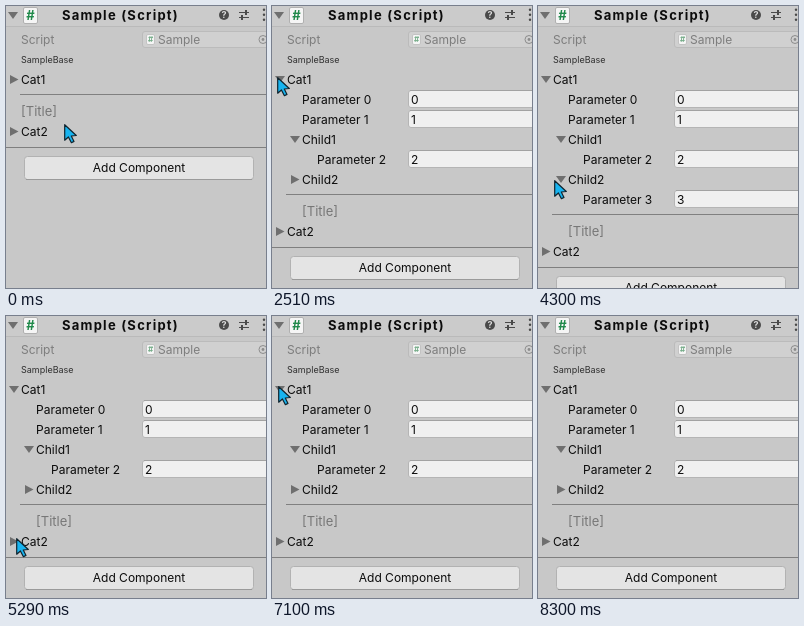
These frames come from a looping animation (260x282 px, 8.83 s). An HTML page with a canvas:

```html
<!DOCTYPE html>
<html lang="en">
<head>
<meta charset="utf-8">
<title>Component inspector</title>
<style>
html, body { margin: 0; width: 100%; height: 100%; overflow: hidden; background: #c8c8c8; }
canvas { display: block; width: 260px; height: 282px; }
</style>
</head>
<body>
<canvas id="stage"></canvas>
<script>
const W = 260, H = 282, LOOP = 8830, ROW = 20;
const canvas = document.getElementById('stage');
const ctx = canvas.getContext('2d');
const dpr = window.devicePixelRatio || 1;
canvas.width = W * dpr;
canvas.height = H * dpr;

const FONT = 'Inter, Roboto, sans-serif';
const INK = '#0c0c0c', ARROW = '#6f6f6f', FADED = '#7d7d7d';

// Pointer legs: first step, last step, number of steps, way points.
const HOME = [58, 118];
const LEGS = [
  [120, 1080, 8, [[61, 172], [57, 226], [40, 168], [26, 104]]],
  [1200, 2230, 8, [[14, 87], [7, 75], [5, 71]]],
  [2640, 3460, 7, [[13, 105], [25, 150], [29, 174]]],
  [3710, 3860, 2, [[15, 174]]],
  [4300, 4300, 1, [[16, 174]]],
  [4880, 5290, 4, [[9, 195], [10, 222]]],
  [6440, 7100, 6, [[10, 165], [8, 100], [6, 70]]],
  [7910, 8170, 3, [[40, 110], [85, 165], [133, 225]]]
];
const HIDE_AT = 8300;

const within = (t, a, b) => t >= a && t < b;

function spline(pts, u) {
  const last = pts.length - 1;
  const i = Math.min(Math.floor(u * last), last - 1);
  const f = u * last - i;
  const at = k => pts[Math.max(0, Math.min(last, k))];
  const [a, b, c, d] = [at(i - 1), at(i), at(i + 1), at(i + 2)];
  return [0, 1].map(n => b[n] + 0.5 * f * (c[n] - a[n] +
    f * (2 * a[n] - 5 * b[n] + 4 * c[n] - d[n] +
    f * (3 * (b[n] - c[n]) + d[n] - a[n]))));
}

function pointerAt(t) {
  let pos = HOME;
  for (const [start, end, steps, pts] of LEGS) {
    if (t < start) break;
    const gap = (end - start) / Math.max(1, steps - 1);
    const step = gap ? Math.min(steps, Math.floor((t - start) / gap + 1e-6) + 1) : 1;
    pos = spline([pos, ...pts], step / steps);
  }
  return pos.map(Math.round);
}

function text(str, x, y, { size = 12, color = INK, weight = 400, align = 'left', spacing = 0 } = {}) {
  ctx.font = `${weight} ${size}px ${FONT}`;
  ctx.letterSpacing = spacing + 'px';
  ctx.textAlign = align;
  ctx.fillStyle = color;
  ctx.fillText(str, x, y);
}

function rect(x, y, w, h, color) {
  ctx.fillStyle = color;
  ctx.fillRect(x, y, w, h);
}

function box(x, y, w, h, r, fill, stroke) {
  ctx.beginPath();
  ctx.roundRect(x + 0.5, y + 0.5, w - 1, h - 1, r);
  ctx.fillStyle = fill;
  ctx.fill();
  ctx.lineWidth = 1;
  ctx.strokeStyle = stroke;
  ctx.stroke();
}

function disc(x, y, r, color) {
  ctx.beginPath();
  ctx.arc(x, y, r, 0, Math.PI * 2);
  ctx.fillStyle = color;
  ctx.fill();
}

function polygon(pts, color) {
  ctx.beginPath();
  pts.forEach(([x, y]) => ctx.lineTo(x, y));
  ctx.closePath();
  ctx.fillStyle = color;
  ctx.fill();
}

function foldArrow(x, y, open) {
  polygon(open
    ? [[x - 5, y - 3.5], [x + 5, y - 3.5], [x, y + 3.5]]
    : [[x - 4, y - 4.5], [x + 4.5, y], [x - 4, y + 4.5]], ARROW);
}

function foldout(name, x, y, open) {
  foldArrow(x - 7, y - 4.5, open);
  text(name, x, y);
}

function parameter(n, x, y) {
  text('Parameter ' + n, x, y);
  box(136, y - 14, 130, 18, 2.5, '#f0f0f0', '#b5b5b5');
  rect(138, y - 14, 122, 1, '#a2a2a2');
  text(String(n), 139, y);
}

function scriptIcon(x, y, w, h, size, border, color) {
  box(x, y, w, h, 1.5, '#f5f5f5', border);
  text('#', x + w / 2, y + h / 2 + size * 0.37, { size, color, weight: 700, align: 'center' });
}

function header() {
  rect(0, 0, W, 20, '#cbcbcb');
  rect(0, 20, W, 1, '#bababa');
  foldArrow(7, 9.5, true);
  scriptIcon(17, 1, 15, 17, 13, '#b0b0b0', '#218a4b');
  text('Sample (Script)', 56, 14, { size: 13, weight: 700, spacing: 1.25 });

  disc(218, 9, 5, '#4a4a4a');
  text('?', 218, 12.3, { size: 9, weight: 700, color: '#dddddd', align: 'center' });

  rect(233, 6, 10, 1, '#4a4a4a');
  rect(233, 11, 10, 1, '#4a4a4a');
  rect(239, 4, 2, 5, '#4a4a4a');
  rect(235, 9, 2, 5, '#4a4a4a');

  for (const y of [4, 9, 14]) disc(258, y - 0.2, 1.2, '#4a4a4a');
}

function scriptRow() {
  text('Script', 15, 38, { color: FADED });
  box(136, 25, 130, 17, 2.5, '#d0d0d0', '#bbbbbb');
  scriptIcon(140, 28, 9, 11, 8, '#c3c3c3', '#74ac88');
  text('Sample', 152, 38, { color: FADED });
  ctx.beginPath();
  ctx.arc(257, 33.5, 4, 0, Math.PI * 2);
  ctx.strokeStyle = '#8c8c8c';
  ctx.stroke();
  disc(257, 33.5, 1.4, '#8c8c8c');
}

function body(cat1, child2, cat2) {
  text('SampleBase', 15, 57, { size: 9, color: '#303030' });
  let y = 78;
  foldout('Cat1', 15, y, cat1);
  if (cat1) {
    parameter(0, 30, y += ROW);
    parameter(1, 30, y += ROW);
    foldout('Child1', 30, y += ROW, true);
    parameter(2, 45, y += ROW);
    foldout('Child2', 30, y += ROW, child2);
    if (child2) parameter(3, 45, y += ROW);
  }
  rect(14, y + 10, W - 14, 1, '#808080');
  text('[Title]', cat1 ? 30 : 15, y + 32, { size: 13, color: '#777777' });
  foldout('Cat2', 15, y += 52, cat2);
  if (cat2) parameter(4, 30, y += ROW);
  rect(0, y + 11, W, 1, '#7f7f7f');

  box(18, y + 20, 230, 24, 3, '#e4e4e4', '#b2b2b2');
  rect(20, y + 43, 226, 1, '#9a9a9a');
  text('Add Component', 133, y + 36, { align: 'center' });
}

function pointer([x, y]) {
  ctx.save();
  ctx.translate(x + 0.7, y + 0.7);
  polygon([[0, 0], [0, 15.5], [3.7, 12.3], [6.7, 18], [9.3, 16.7], [6.6, 11.3], [11.6, 10.8]], '#18b4f0');
  ctx.lineWidth = 1.2;
  ctx.lineJoin = 'round';
  ctx.strokeStyle = '#10242e';
  ctx.stroke();
  ctx.restore();
}

function draw(t) {
  ctx.setTransform(dpr, 0, 0, dpr, 0, 0);
  rect(0, 0, W, H, '#c8c8c8');
  header();
  scriptRow();
  body(
    within(t, 2510, 7350) || t >= 7630,
    within(t, 4140, 4600),
    within(t, 5560, 6300)
  );
  if (t < HIDE_AT) pointer(pointerAt(t));
}

const begin = performance.now();
function frame() {
  draw((performance.now() - begin) % LOOP);
  requestAnimationFrame(frame);
}
frame();
</script>
</body>
</html>
```
